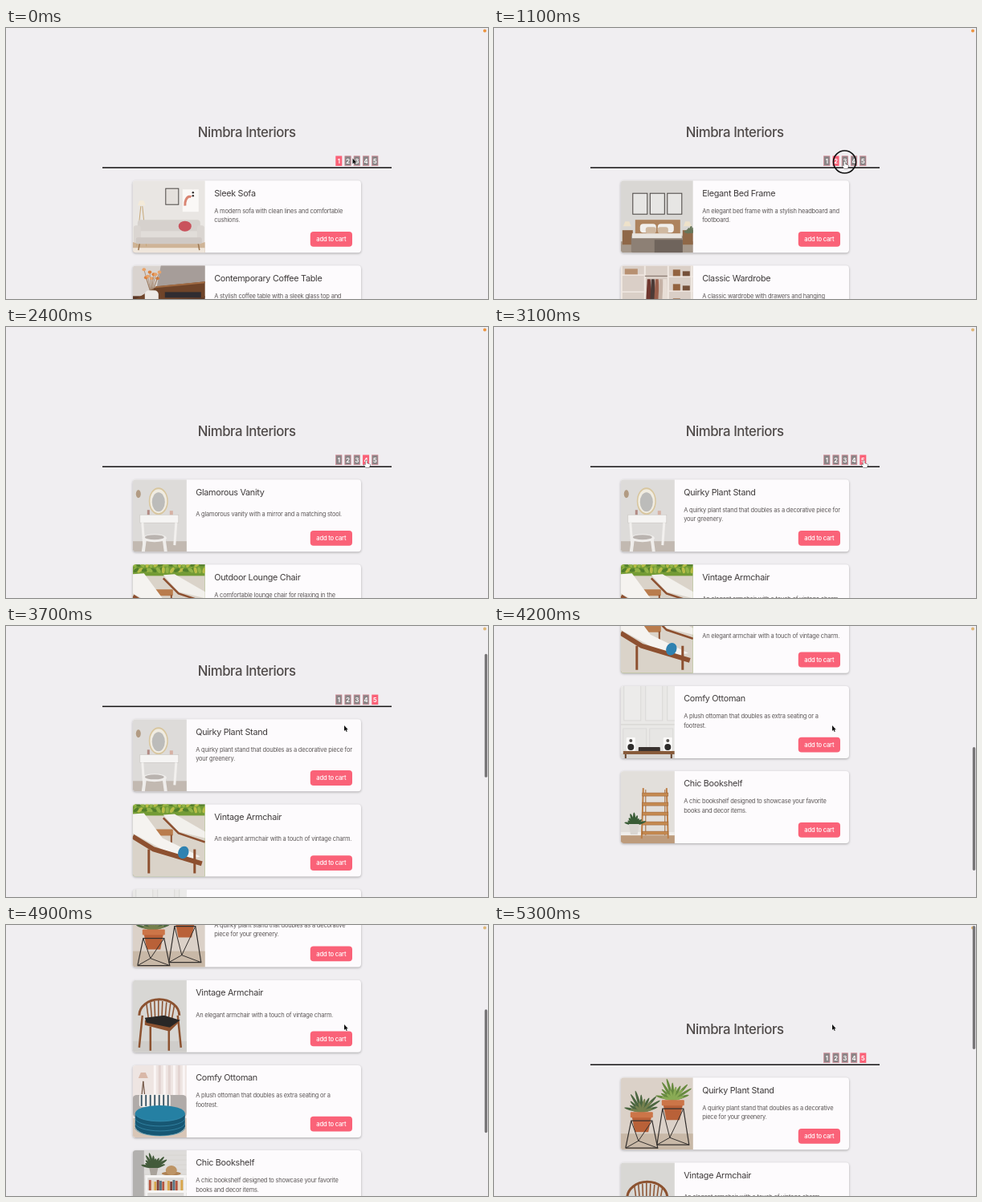
An HTML page with a canvas that plays this animation: 600x338 px, repeating every 5400 ms.

```html
<!DOCTYPE html>
<html lang="en">
<head>
<meta charset="utf-8">
<title>Furniture shop</title>
<style>
html, body { margin: 0; width: 100%; height: 100%; overflow: hidden; background: #f0eef1; }
canvas { display: block; width: 600px; height: 338px; }
</style>
</head>
<body>
<canvas id="stage"></canvas>
<script>
const canvas = document.getElementById('stage');
const ctx = canvas.getContext('2d');
const ratio = window.devicePixelRatio || 1;
canvas.width = 600 * ratio;
canvas.height = 338 * ratio;
const LOOP = 5400, STEP = 100, PINK = '#fa6278';

// Drawing helpers
function rect(color, x, y, w, h) { ctx.fillStyle = color; ctx.fillRect(x, y, w, h); }
function box(color, x, y, w, h, r) {
  ctx.beginPath(); ctx.roundRect(x, y, w, h, r);
  ctx.fillStyle = color; ctx.fill();
}
function frame(color, width, fill, x, y, w, h) {
  rect(fill, x, y, w, h);
  ctx.strokeStyle = color; ctx.lineWidth = width; ctx.strokeRect(x, y, w, h);
}
function trace(pts) {
  ctx.beginPath();
  for (let i = 0; i < pts.length; i += 2) ctx.lineTo(pts[i], pts[i + 1]);
}
function poly(color, ...pts) { trace(pts); ctx.fillStyle = color; ctx.fill(); }
function line(color, width, ...pts) {
  trace(pts); ctx.strokeStyle = color; ctx.lineWidth = width; ctx.stroke();
}
function oval(color, x, y, rx, ry = rx, turn = 0) {
  ctx.beginPath(); ctx.ellipse(x, y, rx, ry, turn, 0, 7);
  ctx.fillStyle = color; ctx.fill();
}
function arch(color, width, x, y, rx, ry = rx, from = Math.PI, to = 2 * Math.PI) {
  ctx.beginPath(); ctx.ellipse(x, y, rx, ry, 0, from, to);
  ctx.strokeStyle = color; ctx.lineWidth = width; ctx.stroke();
}
function repeat(n, fn) { for (let i = 0; i < n; i++) fn(i); }

// Parts shared by the pictures
function room(wall, floor, y) { rect(wall, 0, 0, 90, 90); rect(floor, 0, y, 90, 90 - y); }
function legs(color, width, left, right, top, bottom, splay = 0) {
  line(color, width, left, top, left - splay, bottom);
  line(color, width, right, top, right + splay, bottom);
}
function lamp(color, x, y, size) {
  poly(color, x - size / 2, y, x + size / 2, y, x + size, y + size * 1.2, x - size, y + size * 1.2);
}
function leaves(color, x, y, n, length) {
  repeat(n, i => {
    const a = -2.9 + 2.6 * i / (n - 1), half = length * (.4 + .1 * Math.sin(i * 5));
    oval(color, x + Math.cos(a) * half, y + Math.sin(a) * half, half, 1.6, a);
  });
}
function pot(color, x, y, w, h) {
  poly(color, x - w / 2, y, x + w / 2, y, x + w / 3, y + h, x - w / 3, y + h);
}

// Pictures, each 90 high
function sofa() {
  room('#e9e6e3', '#cfb497', 77);
  legs('#c6a878', 1, 10, 12, 32, 82, 5);
  lamp('#f3ead9', 11, 25, 5);
  frame('#4b4644', 1, '#e4e0dc', 41, 10, 16, 20);
  rect('#faf8f6', 62, 11, 20, 28);
  arch('#d98572', 3, 71, 30, 6, 10, 3, 5);
  repeat(2, i => oval('#2e2929', 75, 15 + i * 4, 1.2));
  rect('#efe6dc', 0, 84, 90, 6);
  legs('#9c7650', 1.5, 9, 81, 76, 87, 2);
  box('#d6d1cd', 6, 49, 78, 22, 4);
  box('#e1ddd9', 6, 63, 78, 9, 2);
  repeat(2, i => box('#dad5d1', 1 + i * 79, 56, 9, 22, 3));
  box('#cfc9c5', 4, 71, 82, 8, 2);
  oval('#c9525c', 65, 57, 8, 6.5);
}
function coffeeTable() {
  room('#d9d3cf', '#5c3826', 38);
  poly('#a69d99', 35, 0, 90, 0, 90, 22, 30, 26);
  poly('#6f4429', 30, 26, 90, 20, 90, 40, 0, 44);
  line('#a06a42', 2, 28, 27, 90, 21);
  rect('#302d31', 40, 33, 45, 7);
  repeat(9, i => {
    const x = 14 + i * 2.4, y = 5 + 11 * Math.abs(Math.sin(i * 2));
    line('#8f6a4c', .6, 23, 36, x, y);
    oval(i % 2 ? '#db7f3b' : '#e8a268', x, y, 2.3, 2);
  });
  box('#eeeae6', 15, 31, 17, 20, 5);
}
function bed() {
  room('#d9d7d4', '#a5988b', 76);
  repeat(3, i => frame('#46423f', 1, '#e7e6e4', 15 + i * 21.5, 16, 18, 26));
  rect('#ad835e', 18, 49, 56, 18);
  repeat(2, i => { rect('#8f6848', 2 + i * 75, 62, 13, 18); lamp('#eee2ca', 8 + i * 75, 51, 5); });
  leaves('#67765a', 86, 65, 6, 9);
  repeat(2, i => box('#f1efec', 24 + i * 22, 54, 20, 11, 4));
  repeat(2, i => box('#d0b9a1', 31 + i * 15, 58, 13, 8, 3));
  box('#8d8075', 13, 68, 64, 22, 2);
  rect('#e9e5e0', 14, 66, 62, 6);
  rect('#6f645c', 42, 74, 35, 16);
}
function wardrobe() {
  room('#dacfc7', '#b89f8b', 80);
  repeat(4, i => {
    rect('#f1e9e3', i * 29, 0, 2, 90);
    rect('#f1e9e3', 0, 11 + i * 21, 29, 1.5);
    rect('#f1e9e3', 60, 13 + i * 18, 30, 1.5);
    rect('#93633f', 65, 5 + i * 18, 9, 8);
    rect('#755039', 77, 7 + i * 18, 9, 6);
  });
  line('#7b6a60', 1, 30, 13, 58, 13);
  ['#70372f', '#4b3b37', '#995f4c', '#c5b2a6', '#e8ded6'].forEach((c, i) => lampCoat(c, 35 + i * 5));
  rect('#b79071', 5, 4, 16, 7);
}
function lampCoat(color, x) { poly(color, x - 2, 17, x + 2, 17, x + 4, 53, x - 4, 53); }
function accentChair() {
  const wood = '#b96f35';
  room('#eadfd2', '#dbc6ad', 68);
  legs(wood, 3, 41, 80, 19, 80);
  rect('#e2d8c9', 17, 22, 64, 28);
  repeat(15, i => line('#b9aa98', .7, 18 + i * 4.3, 22, 16 + i * 4.5, 49));
  poly('#f0e8db', 43, 38, 74, 22, 83, 29, 74, 45);
  poly('#d9cdbd', 14, 43, 50, 38, 87, 46, 58, 59, 14, 51);
  line(wood, 4, 12, 53, 58, 60, 90, 51);
  line(wood, 3.5, 11, 19, 46, 17, 90, 22);
  legs(wood, 4, 14, 58, 20, 88);
}
function dresser() {
  room('#29292b', '#583a29', 43);
  frame('#59554e', 1, '#353738', 38, 3, 18, 25);
  repeat(2, i => {
    lamp('#a3a69b', 23 + i * 45, 5, 11);
    oval('#365066', 23 + i * 45, 30, 7, 11);
  });
  leaves('#5c6848', 8, 38, 7, 14);
  rect('#775038', 0, 42, 90, 4);
  repeat(3, i => frame('#281d18', 1, '#583a29', 3 + i * 29, 49, 27, 34));
}
function vanity() {
  room('#dddbd9', '#c2b9b1', 77);
  oval('#b29b83', 7, 18, 3, 5);
  oval('#d8c69e', 32, 27, 12, 17);
  oval('#f0ece1', 32, 27, 10.5, 15);
  oval('#bcbcba', 32, 28, 8, 12);
  frame('#c9c5c2', .6, '#f5f4f3', 9, 44, 48, 10);
  legs('#f2f0ee', 3, 12, 54, 54, 82, -2);
  rect('#b28a84', 18, 38, 3, 6);
  rect('#d6b1a4', 46, 39, 4, 5);
  legs('#efedeb', 4, 15, 39, 75, 90, 2);
  oval('#f0eeec', 27, 73, 15, 5);
  oval('#b9b3af', 27, 72, 12, 3);
}
function lounger() {
  const wood = '#8d5030';
  room('#739b35', '#dad3c9', 14);
  repeat(40, i => oval(['#b9bd48', '#527f2b', '#92b447'][i % 3], i * 37 % 91, i * 7 % 14, 4, 2, i));
  box('#b97c4d', 26, 31, 24, 8, 1);
  legs(wood, 2, 29, 48, 38, 50);
  poly('#f2f0ec', 38, 13, 52, 12, 90, 34, 90, 42, 57, 34);
  line(wood, 2.5, 38, 17, 57, 36, 90, 47);
  poly('#f5f3f0', 0, 12, 14, 11, 37, 42, 84, 65, 62, 70, 0, 36);
  line(wood, 6, 0, 40, 26, 56, 86, 74);
  legs(wood, 3, 20, 77, 56, 86);
  oval('#2f82b1', 63, 60, 6.5, 8, .4);
}
function turntable() {
  room('#e9e8e6', '#d9d7d4', 84);
  repeat(3, i => frame('#d6d4d2', .8, '#ecebea', 4 + i * 27, -10, 21, 53));
  line('#d2d0ce', 1, 0, 48, 67, 48);
  repeat(2, i => {
    const x = 7 + i * 46;
    frame('#d6d4d2', .7, '#e7e6e4', 3 + i * 33, 53, 29, 27);
    box('#faf9f8', x, 64, 11, 18, 1);
    oval('#2d2b2a', x + 5.5, 76, 4);
    oval('#56524f', x + 5.5, 68, 2);
  });
  box('#38312e', 22, 76, 27, 6, 1);
  rect('#875a39', 3, 81, 64, 4);
  legs('#65432d', 2, 6, 63, 85, 90);
}
function ladderShelf() {
  room('#e2dfdb', '#bd9b7c', 80);
  rect('#f0eeeb', 0, 76, 67, 4);
  legs('#bd7e45', 2, 28, 57, 21, 84, 2);
  legs('#a56735', 1, 31, 55, 23, 80);
  repeat(5, i => frame('#945c30', .5, '#c58a50', 27, 27 + i * 12, 32, 4));
  leaves('#395c36', 17, 67, 9, 16);
  pot('#d9d6d2', 16.5, 66, 13, 13);
}
function plantStand() {
  const wire = '#34302e';
  room('#dbd1c8', '#c8b8a7', 70);
  repeat(2, i => {
    const x = 26 + i * 39, y = 43 - i * 15, base = 88 - i * 4;
    leaves(i ? '#678a3f' : '#4b6640', x, y, 11, 28);
    leaves(i ? '#8aab55' : '#75804e', x, y, 6, 18);
    pot('#b96138', x, y + 4, 25, 21);
    box('#cc7548', x - 14, y, 28, 7, 1);
    line(wire, 1, x - 13, y + 11, x - 4, base - 9, x + 13, y + 11);
    line(wire, 1, x - 20, base, x - 4, base - 9, x + 20, base);
    line(wire, 1.2, x - 20, base, x - 13, y + 11, x + 13, y + 11, x + 20, base, x - 20, base);
  });
}
function armchair() {
  const wood = '#8c5230';
  room('#d8d7d4', '#cfcdca', 76);
  repeat(8, i => line(wood, 1.5, 17 + i * 5, 25 + Math.abs(i - 3) * 1.3, 20 + i * 4, 52));
  arch(wood, 3, 33, 44, 25, 20);
  legs(wood, 2.5, 12, 56, 44, 84, 4);
  legs(wood, 2.5, 22, 45, 58, 88);
  poly(wood, 15, 50, 58, 52, 46, 64, 15, 56);
  poly('#292726', 15, 47, 39, 44, 59, 50, 46, 59, 17, 53);
}
function ottoman() {
  room('#eee5e2', '#d8c6b7', 66);
  repeat(8, i => rect(i % 2 ? '#e2d3d0' : '#faf6f5', 26 + i * 6, 0, 3, 50));
  legs('#745847', 1.2, 13, 13, 20, 48, 3);
  lamp('#d9b8a8', 13, 9, 6);
  box('#b0aba9', 0, 37, 67, 28, 5);
  box('#f2efec', 8, 36, 39, 16, 3);
  repeat(7, i => rect('#345061', 10 + i * 5.5, 37, 1.8, 14));
  oval('#175773', 34, 76, 31, 12);
  rect('#175773', 3, 60, 62, 17);
  oval('#2580a3', 34, 60, 31, 10);
  repeat(4, i => arch('#3b91b2', .7, 34, 60 + i * 6, 31, 10, 0, Math.PI));
}
function bookshelf() {
  const spines = ['#b75740', '#d9a64b', '#587482', '#e6d5bd', '#7d4038'];
  room('#dedcda', '#c4b8aa', 84);
  repeat(14, i => line('#d0cecb', .6, 0, i * 6, 67, i * 6));
  rect('#b2b0ae', 0, 0, 14, 90);
  leaves('#435b3b', 26, 22, 11, 20);
  pot('#a9a39b', 26, 22, 11, 9);
  oval('#ae8254', 48, 29, 12, 2.5);
  oval('#bd9465', 48, 25, 7, 6);
  repeat(13, i => rect(spines[i * 3 % 5], 20 + i * 3.3, 37 + i % 3, 2.9, 13));
  repeat(3, i => rect('#f7f6f5', 16, 31 + i * 19, 51, 3));
  legs('#f4f3f2', 3, 17, 65, 31, 87);
}

const texts = [
  [['Sleek Sofa', 'A modern sofa with clean lines and comfortable cushions.'],
   ['Contemporary Coffee Table', 'A stylish coffee table with a sleek glass top and metal legs.']],
  [['Elegant Bed Frame', 'An elegant bed frame with a stylish headboard and footboard.'],
   ['Classic Wardrobe', 'A classic wardrobe with drawers and hanging space.']],
  [['Coastal Accent Chair', 'A coastal-inspired accent chair with a breezy and relaxed design.'],
   ['Farmhouse Dresser', 'A farmhouse-style dresser with a distressed finish and drawers.']],
  [['Glamorous Vanity', 'A glamorous vanity with a mirror and a matching stool.'],
   ['Outdoor Lounge Chair', 'A comfortable lounge chair for relaxing in the garden.']],
  [['Quirky Plant Stand', 'A quirky plant stand that doubles as a decorative piece for your greenery.'],
   ['Vintage Armchair', 'An elegant armchair with a touch of vintage charm.'],
   ['Comfy Ottoman', 'A plush ottoman that doubles as extra seating or a footrest.'],
   ['Chic Bookshelf', 'A chic bookshelf designed to showcase your favorite books and decor items.']]
];
const pictures = [
  [sofa, coffeeTable], [bed, wardrobe], [accentChair, dresser],
  [vanity, lounger, turntable, ladderShelf], [plantStand, armchair, ottoman, bookshelf]
];
const portraits = [vanity, turntable, ladderShelf, armchair, ottoman, bookshelf];

// Page layout
function setFont(size, weight = 400) {
  ctx.font = `${weight} ${size}px Inter, "Liberation Sans", sans-serif`;
  ctx.letterSpacing = -.027 * size + 'px';
}
function write(str, x, y, size, color, weight, align = 'left') {
  setFont(size, weight);
  ctx.textAlign = align;
  ctx.fillStyle = color;
  ctx.fillText(str, x, y);
}
function wrap(str, width) {
  const lines = [''];
  setFont(7.5);
  for (const word of str.split(' ')) {
    const last = lines.length - 1, next = (lines[last] + ' ' + word).trim();
    if (ctx.measureText(next).width > width) lines.push(word);
    else lines[last] = next;
  }
  return lines;
}
function drawCard([title, description], paint, y) {
  const width = portraits.includes(paint) ? 67 : 90, x = width + 11.4;
  ctx.save();
  ctx.translate(157.8, y);
  ctx.shadowColor = 'rgba(0,0,0,.3)';
  ctx.shadowBlur = 3 * ratio;
  ctx.shadowOffsetY = ratio;
  box('#fdfbfd', 0, 0, 284.2, 90, 4);
  ctx.shadowColor = 'transparent';
  ctx.save();
  ctx.beginPath(); ctx.roundRect(0, 0, width, 90, [4, 0, 0, 4]); ctx.clip();
  paint();
  ctx.restore();
  write(title, x, 19.3, 10.8, '#3f3b3b');
  const lines = wrap(description, 273.2 - x);
  lines.forEach((str, i) => write(str, x, 51.7 - lines.length * 5.7 + i * 11.4, 7.5, '#5c5757'));
  box(PINK, 221, 63.8, 52.2, 18.8, 4);
  write('add to cart', 247, 76, 7.6, '#fff', 500, 'center');
  ctx.restore();
}
function drawHeader(page) {
  write('Nimbra Interiors', 299.7, 136, 16.8, '#504b4a', 500, 'center');
  repeat(5, i => {
    const x = 410.3 + i * 11.25;
    if (i === page) rect(PINK, x, 159.5, 8, 12.5);
    else frame('#d98995', .7, '#8b8587', x + .3, 159.8, 7.4, 11.9);
    write(i + 1, x + 4, 168.8, 7.5, '#fff', 700, 'center');
  });
  rect('#141213', 120, 173.5, 360, 1.5);
}

// Motion: four clicks at an even pace, then a scroll down and back up
const clickAt = i => 150 + 900 * i;
const clicksBy = t => Math.max(0, Math.min(4, Math.floor((t - clickAt(0)) / 900) + 1));
function ease(t, from, to) {
  const u = Math.max(0, Math.min(1, (t - from) / (to - from)));
  return u * u * (3 - 2 * u);
}
const scrollAt = t => 395 * (ease(t, 3400, 4485) - ease(t, 4574, 5300));
function pointerAt(t) {
  let x = 431.5 - 7 * ease(t, 0, 150), y = 162.5 + 4.5 * ease(t, 0, 150);
  for (let i = 1; i < 4; i++) x += 12 * ease(t, clickAt(i) - 250, clickAt(i) - 50);
  const leave = ease(t, 3150, 3450);
  return [x + (421 - x) * leave, y + (124 - y) * leave];
}
const arrow = new Path2D('M0 0V7L1.6 5.6 2.7 8 3.8 7.5 2.7 5.2H4.8Z');
const hand = new Path2D('M-1 0Q0-1.2 1 0V3L4 4Q5 4.5 4.5 6L3.5 8.5H-.5L-3 5Q-3 3.5-1 5Z');

function drawPointer(t) {
  const [x, y] = pointerAt(t);
  const over = y > 159 && (x - 410.3) % 11.25 < 8;
  const clicks = clicksBy(t);
  if (clicks && t - clickAt(clicks - 1) < 250) arch('#111', 1.6, x, y, 14, 14, 0, 7);
  ctx.save();
  ctx.translate(x, y);
  ctx.lineWidth = .8;
  ctx.fillStyle = over ? '#fff' : '#111';
  ctx.strokeStyle = over ? '#222' : '#fff';
  ctx.stroke(over ? hand : arrow);
  ctx.fill(over ? hand : arrow);
  ctx.restore();
}

function draw(t) {
  const scroll = scrollAt(t), page = clicksBy(t - 150);
  const shown = t < 4550 ? Math.min(3, clicksBy(t - 450)) : 4; // pictures load after the text
  ctx.setTransform(ratio, 0, 0, ratio, 0, 0);
  rect('#f0eef1', 0, 0, 600, 338);
  ctx.save();
  ctx.translate(0, -scroll);
  drawHeader(page);
  texts[page].forEach((text, i) => drawCard(text, pictures[shown][i], 190.2 + i * 106.15));
  ctx.restore();
  oval(t < 2500 ? '#ec943f' : '#deb676', 596, 3.5, 2);
  if (t >= 3500) box('#777577', 595.8, 1 + scroll * .458, 3.4, 154, 1.7);
  drawPointer(t);
}

function tick() {
  const t = performance.now() % LOOP;
  draw(Math.floor(t / STEP) * STEP);
  requestAnimationFrame(tick);
}
tick();
</script>
</body>
</html>
```
